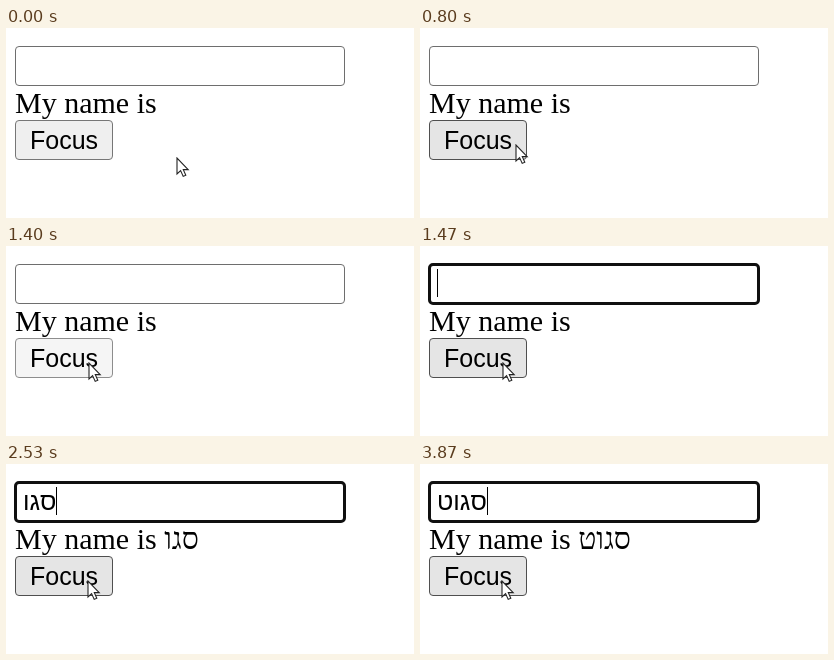
These frames come from a looping animation (408 px wide and 190 px high, 4.07 s). An HTML page:

```html
<!DOCTYPE html>
<html lang="en">
<head>
<meta charset="utf-8">
<title>Focus demo</title>
<style>
html, body { margin: 0; width: 100%; height: 100%; overflow: hidden; background: #fff; }
.stage { position: relative; width: 408px; height: 190px; overflow: hidden; color: #000; }
.stage > * { position: absolute; box-sizing: border-box; white-space: pre; }

/* every part shares one 4070 ms clock and changes in hard steps */
.ring, .typed, .typed::after, .echo::after, .button, .pointer {
  animation: 4070ms step-end infinite;
}

.field { left: 9px; top: 18px; width: 330px; height: 40px; border: 1px solid #6e6e6e; border-radius: 4px; }
.ring { left: 8px; top: 17px; width: 332px; height: 42px; border: 3px solid #101010; border-radius: 5px; animation-name: focus; }
.typed {
  left: 17px; top: 23px; height: 28px; box-sizing: content-box !important;
  font: 25px/28px "Liberation Sans", Arial, sans-serif;
  border-right: 1px solid #000; animation-name: caret;
}
.echo { left: 9px; top: 58px; font: 30px/34px "Liberation Serif", "Times New Roman", serif; }
.typed::after, .echo::after { content: ""; animation-name: type; }
.button {
  left: 9px; top: 92px; width: 98px; height: 40px; text-align: center;
  font: 25px/38px "Liberation Sans", Arial, sans-serif;
  background: #efefef; border: 1px solid #767676; border-radius: 4px;
  animation-name: press;
}
.pointer { left: 0; top: 0; width: 14px; height: 22px; animation-name: move; }

@keyframes focus {
  0% { visibility: hidden; }
  36.07%, 100% { visibility: visible; }
}
@keyframes caret {
  0% { border-color: transparent; }
  36.07% { border-color: #000; }
  80.25% { border-color: transparent; }
  93.32%, 100% { border-color: #000; }
}
@keyframes type {
  0% { content: ""; }
  50.8% { content: "ס"; }
  57.2% { content: "סג"; }
  60.64% { content: "סגו"; }
  67.03%, 100% { content: "סגוט"; }
}
@keyframes press {
  0% { background: #efefef; border-color: #767676; }
  17.89% { background: #e5e5e5; border-color: #4f4f4f; }
  34.35% { background: #f5f5f5; border-color: #8d8d8d; }
  36.07%, 100% { background: #e5e5e5; border-color: #4f4f4f; }
}
@keyframes move {
  0% { transform: translate(170px, 129px); }
  3.14% { transform: translate(163px, 129px); }
  4.86% { transform: translate(150px, 129px); }
  6.58% { transform: translate(138px, 129px); }
  8.06% { transform: translate(130px, 129px); }
  11.5% { transform: translate(128px, 126px); }
  12.97% { transform: translate(124px, 125px); }
  14.69% { transform: translate(117px, 123px); }
  16.41% { transform: translate(109px, 121px); }
  17.89% { transform: translate(102px, 118px); }
  19.61% { transform: translate(95px, 116px); }
  21.33% { transform: translate(89px, 114px); }
  22.8% { transform: translate(85px, 114px); }
  24.52% { transform: translate(82px, 116px); }
  37.54%, 100% { transform: translate(81px, 116px); }
}
</style>
</head>
<body>
<div class="stage">
  <div class="field"></div>
  <div class="ring"></div>
  <div class="typed"></div>
  <div class="echo">My name is </div>
  <div class="button">Focus</div>
  <svg class="pointer" viewBox="0 0 14 22">
    <path d="M1 1V17L4.6 13.6L7.2 19.4L9.8 18.3L7.3 12.6H12.2Z" fill="#fff" stroke="#222" stroke-width="1.1"/>
  </svg>
</div>
</body>
</html>
```
